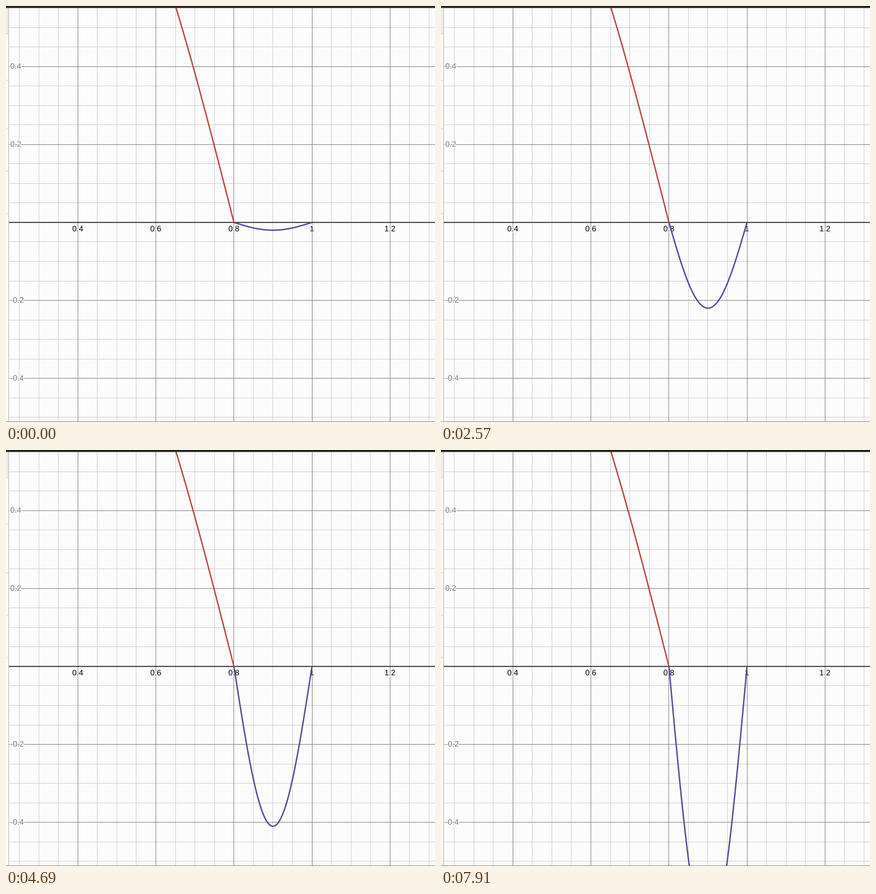
A matplotlib script for the animation above (8000 ms loop, 760 by 737 pixels).

```python
import math

import numpy as np
import matplotlib.pyplot as plt
from matplotlib.animation import FuncAnimation
from matplotlib.patches import Rectangle
from matplotlib.patheffects import withStroke

W, H, DPI = 760, 737, 100
LOOP, STEP = 8000, 20

PAPER = "#fcfcfc"
MINOR, MAJOR = "#d0d0d2", "#848484"
RED, PURPLE = "#b94640", "#5a4496"

X08, Y0 = 403.8, 383.4        # pixel place of (0.8, 0)
SX, SY = 691.4, 690.8         # pixels per unit


def px(x):
    return X08 + (x - 0.8) * SX


def py(y):
    return Y0 - y * SY


def pt(pixels):
    return pixels * 72 / DPI


fig = plt.figure(figsize=(W / DPI, H / DPI), dpi=DPI, facecolor=PAPER)
ax = fig.add_axes([0, 0, 1, 1])
ax.set_xlim(0, W)
ax.set_ylim(H, 0)
ax.axis("off")


def bar(x, y, w, h, color, z=1):
    ax.add_patch(Rectangle((x, y), w, h, fc=color, ec="none", lw=0,
                           zorder=z, snap=False))


def label(x, y, text, color, ha):
    ax.text(x, y, text, color=color, ha=ha, va="baseline", zorder=4,
            family="Liberation Sans", size=pt(14),
            path_effects=[withStroke(linewidth=pt(3), foreground=PAPER)])


# Grid: every fourth line is a major one
for major in (False, True):
    color = MAJOR if major else MINOR
    for k in range(-11, 11):
        if (k % 4 == 0) == major:
            bar(math.floor(px(0.8 + k * 0.05)), 4, 1, H - 4, color, 1 + major)
            if k:
                bar(5, math.floor(py(k * 0.05)), W - 5, 1, color, 1 + major)
bar(5, 382.7, W - 5, 1.5, "#0c0c0c", 3)

for v in (0.4, 0.6, 0.8, 1, 1.2):
    label(px(v) - 0.2, 399.2, f"{v:g}", "black", "center")
for v in (0.4, 0.2, -0.2, -0.4):
    label(7.5, py(v) + 4, f"{v:g}", "#7a7a7a", "left")

# Edge of the side panel, top and bottom borders
bar(0, 0, 4, H, "#fdfdfd", 6)
bar(0, 4, 4, 46, "#ececee", 6)
bar(0, 49, 4, 1, "#cfcfcf", 6)
for y in (131, 217, 292, 367):
    bar(0, y, 4, 1, "#cfcfcf", 6)
bar(4, 4, 1, H - 4, "#c4c4c4", 6)
bar(5, 4, 1, H - 4, "#ececec", 0.5)
bar(0, 0, W, 3.5, "#211e20", 7)
bar(0, 736, W, 1, "#8a8a8a", 7)

# Curves
clip = Rectangle((5, 3), W - 5, 733, transform=ax.transData)


def curve(x, y, color):
    line, = ax.plot(px(x), py(y), color=color, lw=pt(2.4), zorder=5,
                    solid_capstyle="butt", solid_joinstyle="round")
    line.set_clip_path(clip)
    return line


xr = np.linspace(0.63, 0.8, 80)
curve(xr, np.sin(math.pi * xr / 0.8), RED)

u = np.linspace(0, 1, 160)
wave = np.sin(math.pi * u)
dip = curve(0.8 + 0.2 * u, -0.02 * wave, PURPLE)


def depth(t):
    """Slider value in steps of 0.01; pictures come in beats of 20, 20, 100 ms."""
    beat, rest = divmod(t - 30, 140)
    n = 3 * beat + min(rest // 20, 2)
    return 0.02 + 0.01 * max(0, math.floor((n - 6.2) / 2.4))


def draw(i):
    dip.set_ydata(py(-depth(i * STEP + STEP // 2) * wave))
    return dip,


anim = FuncAnimation(fig, draw, frames=LOOP // STEP, interval=STEP,
                     repeat=True, repeat_delay=0, blit=False)
plt.show()
```
